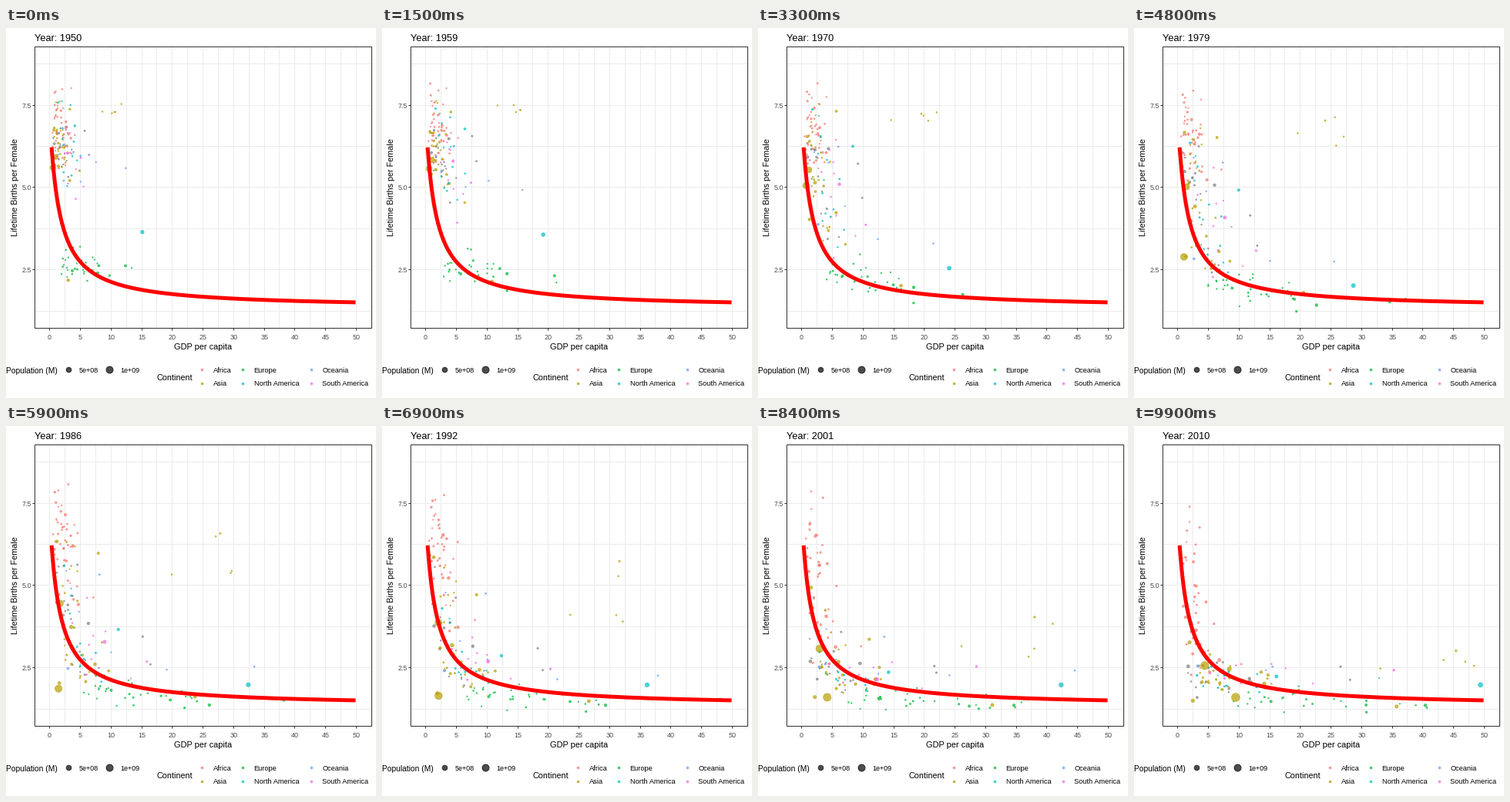
Recreate the animation shown at these times as a matplotlib script. Size 480x480 px, loop 10 s.

```python
import numpy as np
import matplotlib.pyplot as plt
from matplotlib.animation import FuncAnimation
from matplotlib.patches import Rectangle

SIZE, FRAMES, INTERVAL = 480, 100, 100
START, END = 1950, 2010
LEFT, RIGHT, TOP, BOTTOM = 37.5, 474.5, 24.5, 389.5
COLORS = {
    "Africa": "#F8766D", "Asia": "#B79F00", "Europe": "#00BA38",
    "North America": "#00BFC4", "Oceania": "#619CFF",
    "South America": "#F564E3", "Other": "#7F7F7F",
}

plt.rcParams["font.family"] = "Liberation Sans"
fig = plt.figure(figsize=(SIZE / 72, SIZE / 72), dpi=72, facecolor="white")
ax = fig.add_axes([0, 0, 1, 1])
ax.set(xlim=(0, SIZE), ylim=(SIZE, 0))
ax.axis("off")


def px(gdp):
    return 56.8 + 7.95 * gdp


def py(births):
    return 420.4 - 42.7 * births


def radius(pop):
    """Dot radius in pixels for a population in billions."""
    return 0.7 + 4.1 * np.sqrt(pop)


# ---- panel, axes and legend ----
def line(xs, ys, color, width=1, z=1):
    ax.plot(xs, ys, color=color, lw=width, zorder=z, snap=False,
            solid_capstyle="butt")


def label(x, y, text, size=9, color="black", **kw):
    return ax.text(x, y, text, fontsize=size, color=color, va="baseline", **kw)


def dots(x, y, r, color, edge=0.6):
    return ax.scatter(x, y, s=(2 * r) ** 2, c=color, alpha=0.7,
                      edgecolors=color, linewidths=edge, zorder=3)


def draw_panel():
    for gdp in np.arange(0, 51, 2.5):
        x = np.floor(px(gdp)) + 0.5
        line([x, x], [TOP, BOTTOM], "#EBEBEB")
        if gdp % 5 == 0:
            line([x, x], [BOTTOM, BOTTOM + 3], "#333333")
            label(x, 404, f"{gdp:.0f}", color="#4D4D4D", ha="center")
    for births in np.arange(1.25, 9, 1.25):
        y = np.floor(py(births)) + 0.5
        line([LEFT, RIGHT], [y, y], "#EBEBEB")
        if births % 2.5 == 0:
            line([LEFT - 3, LEFT], [y, y], "#333333")
            label(33, y + 3.5, f"{births:.1f}", color="#4D4D4D", ha="right")
    ax.add_patch(Rectangle((LEFT, TOP), RIGHT - LEFT, BOTTOM - TOP, fill=False,
                           ec="#333333", lw=1, zorder=6, snap=False))
    label(255.5, 417, "GDP per capita", 11, ha="center")
    ax.text(12.5, 206.5, "Lifetime Births per Female", fontsize=10.8,
            rotation=90, ha="center", va="center")

    gdp = np.linspace(0.3, 49.9, 300)
    line(px(gdp), py(1.33 + 9.29 / (gdp + 1.6)), "#FF0000", 5, z=5)


def draw_legend():
    label(0, 448, "Population (M)", 10.3)
    for x, pop, text in ((81, 0.5, "5e+08"), (134, 1.0, "1e+09")):
        dots(x, 443.3, radius(pop) - 0.3, "black", 1)
        label(x + 14, 447, text)
    label(195, 457, "Continent", 10.8)
    for i, name in enumerate(list(COLORS)[:6]):
        x, y = (254, 307, 396)[i // 2], (443, 460.5)[i % 2]
        dots(x, y, 1.5, COLORS[name])
        label(x + 14.5, y + 4, name, 9.3)


# ---- countries ----
# Income grows geometrically from gdp0 to gdp1 (bend < 1 means early growth);
# births fall along a logistic curve from high to low around the year mid.
rng = np.random.default_rng(12)
countries, colors = [], []


def country(group, pop, gdp, bend, births, mid, width, wobble=0.0):
    countries.append((*pop, *gdp, bend, *births, mid, width, wobble))
    colors.append(COLORS[group])


def add_cloud(group, n, growth, gdp, bend, spread, births, mid, lag):
    """Scatter n small countries; richer ones start their decline earlier."""
    for wealth, timing, rise, high, low in np.clip(rng.normal(size=(n, 5)), -2, 2):
        pop = min(np.exp(rng.normal(-5.6, 1.3)), 0.05)
        base = np.exp(spread * wealth)
        country(group, (pop, pop * growth),
                (gdp[0] * base, gdp[1] * base * np.exp(0.35 * rise)), bend,
                (births[0] * (1 + 0.09 * high), births[1] * (1 + 0.13 * low)),
                mid + lag * (0.7 * timing - 0.7 * wealth), 7, 1)


add_cloud("Other", 22, 2, (1.8, 6), 1, 0.7, (6.3, 2), 1982, 15)
add_cloud("Africa", 43, 4, (1.3, 2.2), 1, 0.6, (6.8, 2.6), 2008, 13)
add_cloud("Asia", 29, 3, (1.7, 7), 1, 0.75, (6.5, 1.9), 1982, 13)
add_cloud("Europe", 35, 1.2, (5, 22), 0.7, 0.5, (2.75, 1.5), 1973, 7)
add_cloud("North America", 14, 2.2, (3, 9), 1, 0.5, (6.4, 2.1), 1977, 9)
add_cloud("Oceania", 7, 2, (2.8, 6.5), 1, 0.8, (6, 2.4), 1982, 14)
add_cloud("South America", 9, 3, (3.3, 11), 1, 0.4, (6, 2.1), 1978, 9)

# Oil states: rich early, late to have fewer births.
for _ in range(4):
    country("Asia", (0.002, 0.006), (rng.uniform(8, 15), rng.uniform(30, 49)),
            0.7, (7.4, 2.5), rng.uniform(1984, 1998), 6, 1)

# The most populous countries.
country("Asia", (0.55, 1.34), (0.5, 9.45), 2, (5.6, 1.6), 1976.5, 3.5)
country("Asia", (0.37, 1.23), (1, 4.4), 2, (6, 2.1), 1990, 10)
country("Asia", (0.07, 0.24), (1.4, 8.4), 1.3, (5.7, 2.35), 1983, 8)
country("Asia", (0.08, 0.127), (3, 35.7), 0.35, (2.2, 1.3), 1981, 8)
country("Asia", (0.004, 0.028), (10.7, 45.4), 0.8, (7.3, 2.6), 1996, 6)
country("North America", (0.16, 0.31), (15.1, 49.4), 0.85, (3.65, 1.98), 1968, 3)
country("North America", (0.028, 0.115), (4.1, 16.1), 0.6, (6.9, 2.2), 1981, 6)
country("South America", (0.054, 0.195), (2.9, 14.6), 0.7, (6.2, 1.75), 1980, 9)
country("Europe", (0.07, 0.08), (7.8, 40.4), 0.6, (2.4, 1.36), 1971, 3)

(pop0, pop1, gdp0, gdp1, bend, high, low, mid, width, wobble) = np.array(countries).T
phase = rng.uniform(0, 2 * np.pi, (2, len(countries)))
rate = rng.uniform(0.15, 0.45, (2, len(countries)))


def state(year):
    t = (year - START) / (END - START)
    sway = wobble * np.sin(rate * (year - START) + phase)
    gdp = gdp0 * (gdp1 / gdp0) ** (t ** bend) * np.exp(0.06 * sway[0])
    fall = 1 / (1 + np.exp((mid - year) / width))
    births = high + (low - high) * fall + 0.02 * high * sway[1]
    pop = pop0 * (pop1 / pop0) ** t
    gdp = np.where(gdp > 50, np.nan, np.maximum(gdp, 0.45))
    return px(gdp), py(np.clip(births, 1.15, 8.6)), radius(pop)


draw_panel()
draw_legend()
title = label(37, 17, "", 12.7)
points = dots(*state(START), colors)


def update(i):
    year = START + (END - START) * i / (FRAMES - 1)
    x, y, r = state(year)
    points.set_offsets(np.column_stack([x, y]))
    points.set_sizes((2 * r) ** 2)
    title.set_text(f"Year: {round(year)}")
    return points, title


anim = FuncAnimation(fig, update, frames=FRAMES, interval=INTERVAL,
                     repeat=True, repeat_delay=0, blit=False)
plt.show()
```
